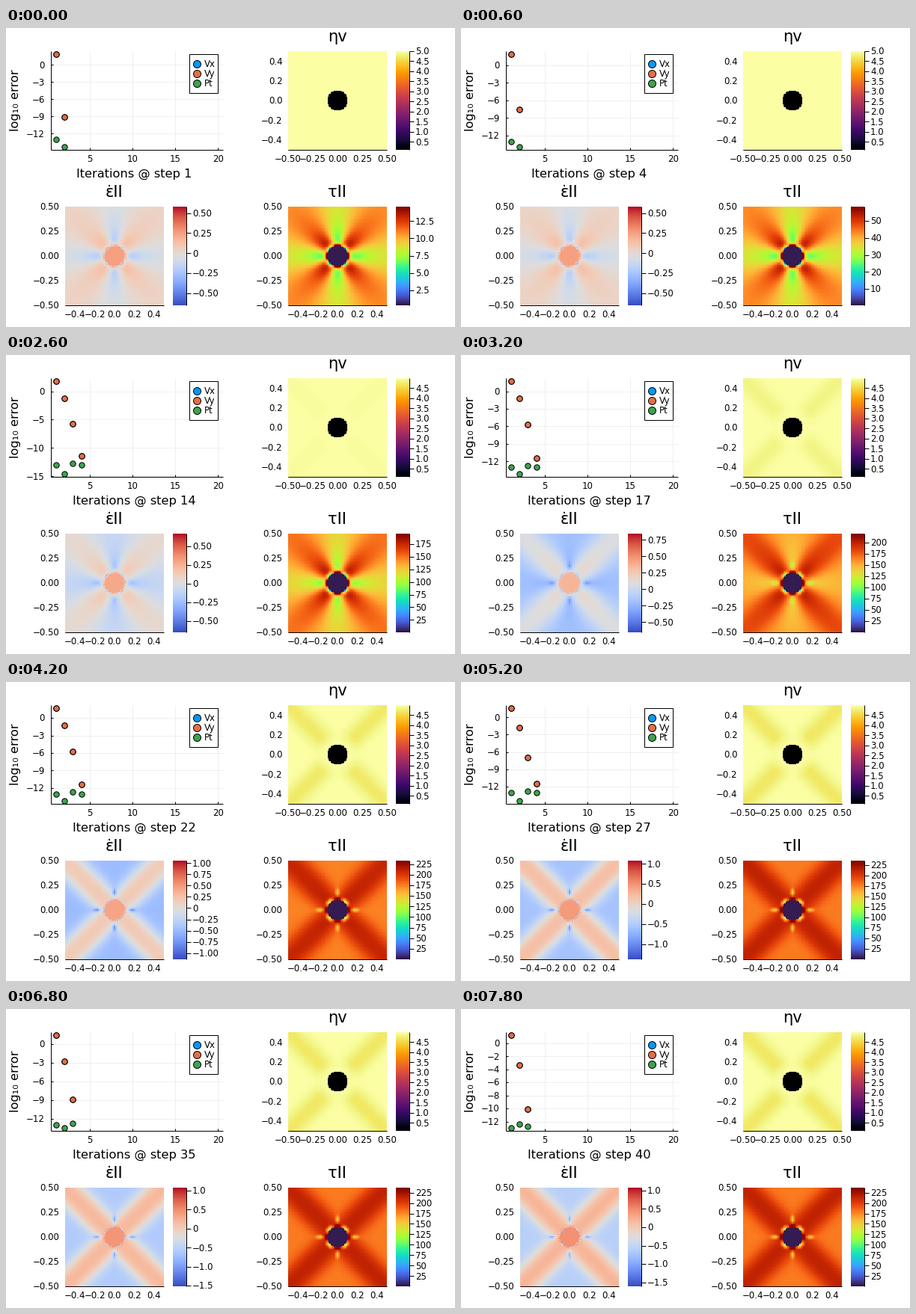
A matplotlib script for the animation above (8 s loop, 600 by 400 pixels).

```python
import numpy as np
import matplotlib.pyplot as plt
from matplotlib.animation import FuncAnimation
from matplotlib.patches import Rectangle

W, H, DPI = 600, 400, 100
STEPS = 40
PX = 72 / DPI
TICK, LABEL, TITLE = 11.8 * PX, 16.3 * PX, 21 * PX
BLUE, ORANGE, GREEN = "#009afa", "#e36f47", "#3da44e"

plt.rcParams["font.family"] = "DejaVu Sans"
fig = plt.figure(figsize=(W / DPI, H / DPI), dpi=DPI, facecolor="white")
ax = fig.add_axes([0, 0, 1, 1])
ax.set_xlim(0, W)
ax.set_ylim(H, 0)
ax.axis("off")


# --- drawing helpers, all in stage pixels ---
def text(x, y, s, size=TICK, ha="center"):
    """Text whose capitals are centred on y."""
    base = y + 0.365 * size / PX
    return ax.text(x, base, s, size=size, ha=ha, va="baseline", zorder=6)


def line(x, y, color="black", width=1.0, z=4):
    return ax.plot(x, y, color=color, lw=width * PX, zorder=z,
                   solid_capstyle="butt")[0]


def dots(x, y, color, diameter):
    return ax.plot(x, y, "o", color=color, ms=diameter * PX, mec="black",
                   mew=PX, zorder=5)[0]


def image(data, box, cmap):
    x0, y0, x1, y1 = box
    return ax.imshow(data, extent=(x0, x1, y1, y0), cmap=cmap, vmin=0, vmax=1,
                     aspect="auto", interpolation="nearest", zorder=2)


def number(v, digits):
    return f"{v:.{digits}f}".replace("-", "\u2212")


def multiples(lo, hi, gap):
    first, last = np.ceil(lo / gap - 1e-6), np.floor(hi / gap + 1e-6)
    return np.arange(first, last + 1) * gap + 0.0


def frame_axes(x0, y0, x1, y1, z=4):
    line([x0, x0], [y0, y1], z=z)
    line([x0, x1], [y1, y1], z=z)


# --- fields on the cell grid ---
N = 100
RADIUS = 0.104
c = (np.arange(N) + 0.5) / N - 0.5
X, Y = np.meshgrid(c, -c)
Z = X + 1j * Y
RHO = np.abs(Z)
COS4 = np.cos(4 * np.angle(Z))
INSIDE = RHO < RADIUS
RIM = np.abs(RHO - RADIUS) < 0.007
CHECK = np.add.outer(np.arange(N), np.arange(N)) % 2 == 1

# Flow around a weak circular inclusion, with a small wall correction
q = (RADIUS / RHO) ** 2
wall = 0.05 * np.minimum(1, RHO / 0.5)
FLOW = np.abs(1 - np.exp(-4j * np.angle(Z)) * (2 * q - 3 * q**2 + wall))

# Diagonal shear bands and the quiet spots beside the inclusion
off = np.minimum(np.abs(X - Y), np.abs(X + Y)) / np.sqrt(2)
along = np.maximum(np.abs(X), np.abs(Y))
across = np.minimum(np.abs(X), np.abs(Y))
BAND = np.exp(-(off / 0.14) ** 2.5)
FAN = np.exp(-(off / 0.11) ** 2) * np.clip((RHO - 0.11) / 0.13, 0, 1)
SPOT = np.exp(-((along - 0.178) / 0.035) ** 2 - (across / 0.016) ** 2)
RING = np.exp(-((RHO - 0.115) / 0.022) ** 2)


# --- loading history ---
def ramp(step, middle, width):
    return 1 / (1 + np.exp((middle - step) / width))


def yielding(step):
    return ramp(step, 16.8, 1.8)


def viscosity(step):
    eta = np.where(INSIDE, 0.1, 5 - 0.32 * yielding(step) * FAN)
    return (eta - 0.1) / 4.9


def rate_limits(step):
    lo = -0.65 - 0.6 * ramp(step, 21, 0.9) - 0.018 * max(0, step - 20)
    return lo, 0.58 + 0.5 * yielding(step)


def strain_rate(step, lo, hi):
    w = ramp(step, 19.3, 2)
    early = np.log10(np.maximum(FLOW, 0.3))
    late = -0.6 + 0.8 * BAND - 0.75 * SPOT + 0.35 * RING * (1 - BAND)
    core = 0.25 + 0.2 * yielding(step)
    e = np.where(INSIDE | RIM, core, (1 - w) * early + w * late)
    e = e - (0.25 + 0.6 * w) * (RIM & CHECK)
    return np.clip((e - lo) / (hi - lo), 0, 1)


def stress_limit(step):
    """Linear loading that bends over smoothly at the yield stress."""
    x = 14.6 * step / 237
    return 237 * x / (1 + x**7) ** (1 / 7)


def stress(step):
    w = yielding(step)
    early = np.minimum(0.67 * FLOW, 1)
    late = 0.755 + 0.15 * BAND - 0.24 * SPOT + RING * (0.22 * COS4 - 0.08)
    return np.where(INSIDE, 0.015, np.clip((1 - w) * early + w * late, 0, 1))


def residuals(step):
    """Newton iterations: digits double until the velocity error is small."""
    vel = [1.9 - 0.0004 * step**2]
    r = np.interp(step, [1, 9, 14, 21, 40], [-9.05, -5.2, -1.2, -1.1, -3.4])
    vel.append(r)
    while r > -7.5:
        r = max(2 * r - 3.35, -11.4)
        vel.append(r)
    dip = np.interp(step, [1, 9, 14, 18, 30, 40],
                    [-14.35, -13.25, -14.6, -14.05, -14.6, -12.4])
    pres = [-13, dip, -12.7, -13][:len(vel)]
    return np.array(vel), np.array(pres)


# --- fixed parts ---
TOP, BOTTOM = (31, 163), (239, 371)
SIDE = 132
LEFT, RIGHT = 60, 290


def err_x(i):
    return LEFT + (i - 0.43) / 20.14 * (RIGHT - LEFT)


frame_axes(LEFT, TOP[0], RIGHT, TOP[1])
for i in (5, 10, 15, 20):
    px = err_x(i)
    line([px, px], TOP, "#ebebeb", 0.8, 1)
    line([px, px], [TOP[1] - 3, TOP[1]])
    text(px, 174.4, str(i))
ax.text(20, 97, "log\u2081\u2080 error", size=LABEL, rotation=90,
        ha="right", va="center")

ax.add_patch(Rectangle((244.5, 35), 38, 52, fc="white", ec="black",
                       lw=PX, zorder=4))
for k, (name, color) in enumerate((("Vx", BLUE), ("Vy", ORANGE), ("Pt", GREEN))):
    dots([255], [48 + 13 * k], color, 10)
    text(264.7, 48 + 13 * k, name, ha="left")


def map_panel(x0, span, title, cmap, xt, yt, digits):
    """Axes, title, labels and colour bar; returns the heat map."""
    y0, y1 = span
    x1, cx, cy = x0 + SIDE, x0 + SIDE / 2, (y0 + y1) / 2
    text(cx - 0.3, y0 - 20.3, title, TITLE)
    for v in xt:
        text(cx + SIDE * v, y1 + 11.4, number(v, digits[0]))
    for v in yt:
        text(x0 - 7.5, cy - SIDE * v, number(v, digits[1]), ha="right")
    frame_axes(x0, y0, x1, y1, z=1)
    bar = np.linspace(1, 0, 256)[:, None]
    line([x0 + 162, x0 + 162], [y0, y1], z=1)
    image(bar, (x0 + 144, y0, x0 + 162, y1), cmap)
    return image(np.zeros((N, N)), (x0, y0, x1, y1), cmap)


fine = np.linspace(-0.5, 0.5, 5)
coarse = np.linspace(-0.4, 0.4, 5)
eta_map = map_panel(377, TOP, "\u03b7v", "inferno", fine, coarse, (2, 1))
rate_map = map_panel(79, BOTTOM, "\u03b5\u0307II", "coolwarm", coarse, fine, (1, 2))
stress_map = map_panel(377, BOTTOM, "\u03c4II", "turbo", coarse, fine, (1, 2))

# --- changing parts ---
live = []


def bar_ticks(x, span, lo, hi, gap, digits):
    y0, y1 = span
    for v in multiples(lo, hi, gap):
        y = y1 - (v - lo) / (hi - lo) * (y1 - y0)
        live.append(line([x, x + 6], [y, y]))
        live.append(text(x + 8, y, number(v, digits if v else 0), ha="left"))


def error_plot(step):
    vel, pres = residuals(step)
    both = np.concatenate([vel, pres])
    pad = 0.03 * np.ptp(both)
    lo, hi = both.min() - pad, both.max() + pad

    def err_y(v):
        return TOP[1] - (v - lo) / (hi - lo) * (TOP[1] - TOP[0])

    gap = 5 if lo < -15 else 2 if hi - lo < 15.5 else 3
    for v in multiples(lo, hi, gap):
        y = err_y(v)
        live.append(line([LEFT, RIGHT], [y, y], "#ebebeb", 0.8, 1))
        live.append(line([LEFT, LEFT + 3], [y, y]))
        live.append(text(51.8, y, number(v, 0), ha="right"))
    for data, color in ((vel, BLUE), (vel, ORANGE), (pres, GREEN)):
        xs = err_x(np.arange(1, len(data) + 1))
        live.append(dots(xs, err_y(data), color, 7.4))
    live.append(text(171.6, 194.3, f"Iterations @ step {step}", LABEL))


def update(frame):
    step = frame + 1
    while live:
        live.pop().remove()
    error_plot(step)

    eta_map.set_data(viscosity(step))
    bar_ticks(539, TOP, 0.1, 5.0 if yielding(step) < 0.05 else 4.99, 0.5, 1)

    lo, hi = rate_limits(step)
    rate_map.set_data(strain_rate(step, lo, hi))
    gap, digits = (0.25, 2) if hi - lo < 2.3 else (0.5, 1)
    bar_ticks(241, BOTTOM, lo, hi, gap, digits)

    top = stress_limit(step)
    stress_map.set_data(stress(step))
    gap = next(g for g in (2.5, 5, 10, 25) if top / g <= 9.7)
    bar_ticks(539, BOTTOM, 0.3, top, gap, 1 if gap == 2.5 else 0)
    return []


anim = FuncAnimation(fig, update, frames=STEPS, interval=200, repeat=True,
                     repeat_delay=0, init_func=lambda: [], blit=False)
plt.show()
```
